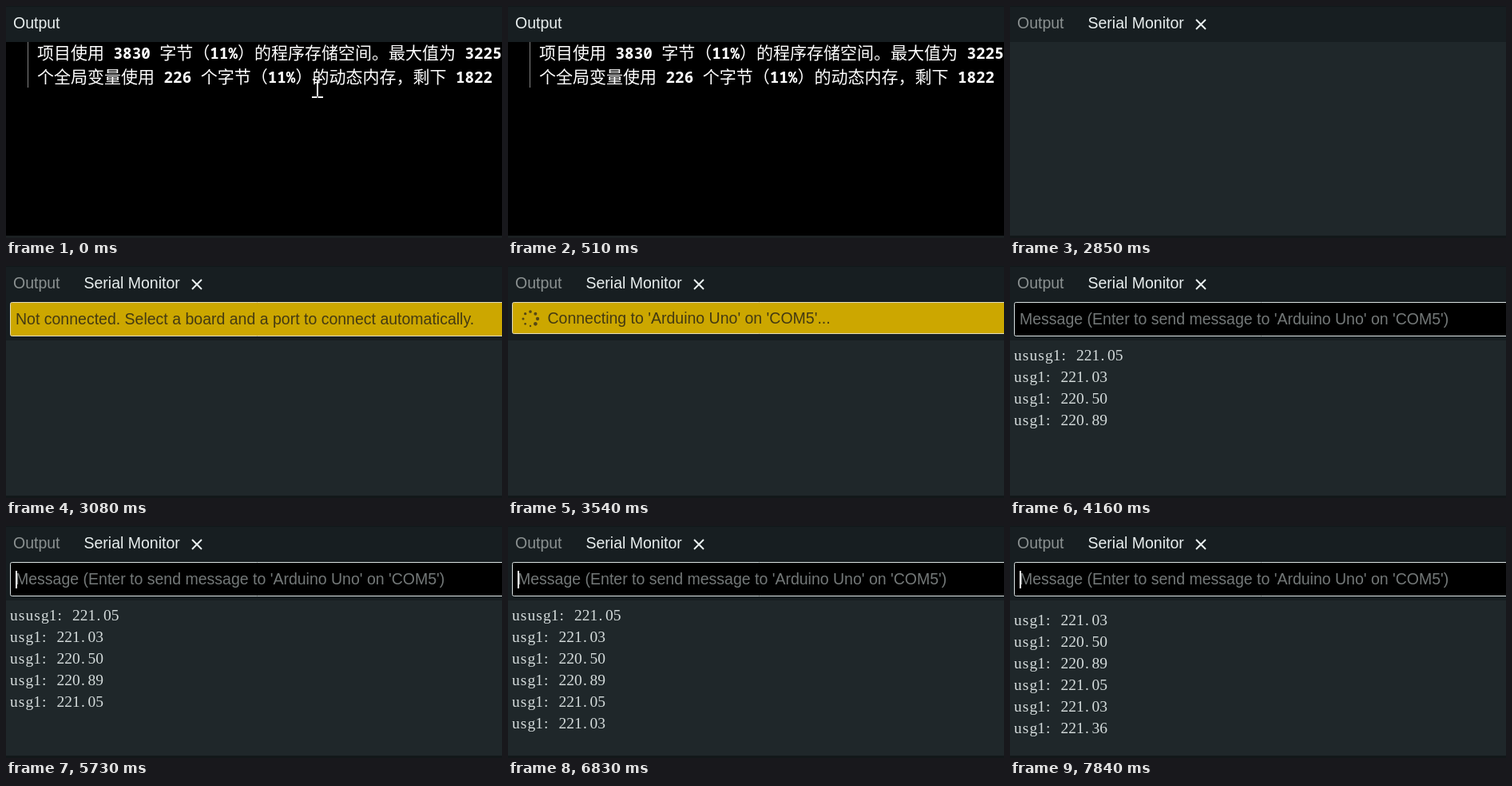
Recreate the animation shown at these times as an HTML page with a canvas. Size 621 by 290 pixels, loop 8 s.

```html
<!DOCTYPE html>
<html lang="zh">
<head>
<meta charset="utf-8">
<title>Serial monitor</title>
<style>
  html, body { margin: 0; width: 100%; height: 100%; overflow: hidden; background: #000; }
  canvas { display: block; width: 621px; height: 290px; }
</style>
</head>
<body>
<canvas id="stage" width="621" height="290"></canvas>
<script>
const ctx = document.getElementById('stage').getContext('2d');
const LOOP = 8000, W = 621, H = 290;
const UI = '19.5px "Liberation Sans", Arial, sans-serif';
const CJK = '21px "Noto Sans CJK SC", "Noto Sans CJK", sans-serif';
const MONO = 'bold 19.25px "Noto Sans Mono", monospace';
const LOG = '19.5px "Liberation Serif", serif';
const HEADER = '#171e21', PANEL = '#1f272a', LIGHT = '#e9efef';

const BUILD = [
  '项目使用 3830 字节（11%）的程序存储空间。最大值为 3225',
  '个全局变量使用 226 个字节（11%）的动态内存，剩下 1822'
];
const READINGS = ['ususg1: 221.05', 'usg1: 221.03', 'usg1: 220.50', 'usg1: 220.89',
  'usg1: 221.05', 'usg1: 221.03', 'usg1: 221.36'];
const CARET_TOGGLES = [3630, 4160, 4710, 5190, 5730, 6280, 6830, 7290, 7840];

function rect(x, y, w, h, color) {
  ctx.fillStyle = color;
  ctx.fillRect(x, y, w, h);
}

function text(str, x, y, color, font = UI) {
  ctx.font = font;
  ctx.fillStyle = color;
  ctx.fillText(str, x, y);
}

function line(color, width, ...segments) {
  ctx.strokeStyle = color;
  ctx.lineWidth = width;
  ctx.beginPath();
  for (const [x1, y1, x2, y2] of segments) {
    ctx.moveTo(x1, y1);
    ctx.lineTo(x2, y2);
  }
  ctx.stroke();
}

// Full-width characters take 21 px, ASCII ones 11.55 px.
function mixedText(str, x, y) {
  for (const run of str.match(/[ -~]+|[^ -~]+/g)) {
    const ascii = run.charCodeAt(0) < 128;
    text(run, x, y, '#fff', ascii ? MONO : CJK);
    x += run.length * (ascii ? 11.55 : 21);
  }
}

// Serif glyphs on a fixed 9.75 px pitch; punctuation sits left in its cell.
function logLine(str, y) {
  ctx.font = LOG;
  [...str].forEach((ch, i) => {
    const slack = 9.75 - ctx.measureText(ch).width;
    text(ch, 5 + i * 9.75 + slack * (/[.:]/.test(ch) ? 0.25 : 0.5), y, '#d5dcdc', LOG);
  });
}

function iBeam(x, y) {
  line('#fff', 2, [x, y - 11, x, y + 10],
    [x - 6, y - 11, x - 1.5, y - 11], [x + 1.5, y - 11, x + 6, y - 11],
    [x - 7, y + 11, x - 0.5, y + 11], [x + 0.5, y + 11, x + 7, y + 11]);
}

function field(height, fill, border) {
  ctx.beginPath();
  ctx.roundRect(5.5, 45.5, W, height - 1, 2);
  ctx.fillStyle = fill;
  ctx.fill();
  ctx.strokeStyle = border;
  ctx.lineWidth = 1;
  ctx.stroke();
}

function spinner(x, y) {
  ctx.fillStyle = '#574914';
  for (let i = 0; i < 8; i++) {
    const angle = (i - 6) * Math.PI / 4;
    ctx.beginPath();
    ctx.arc(x + 9 * Math.cos(angle), y + 9 * Math.sin(angle), 1.2 + 0.16 * i, 0, 7);
    ctx.fill();
  }
}

function outputTab(t) {
  rect(0, 45, W, 242, '#000');
  text('Output', 9, 27.5, LIGHT);
  rect(27, 45, 1, 57, '#808080');
  mixedText(BUILD[0], 39, 66);
  mixedText(BUILD[1], 39, 95.5);
  if (t < 70) iBeam(390, 103);
  else if (t >= 280 && t < 510) {
    const p = Math.floor((t - 280) / 77) / 2;
    iBeam(Math.round(395 + 108 * p), 255 - 198 * p);
  }
}

function readings(t) {
  const count = t < 3700 ? 0 : t < 5260 ? 4 : t < 6360 ? 5 : t < 7290 ? 6 : 7;
  const first = count === 7 ? 1 : 0;
  const scroll = first * 21;
  for (let i = first; i < count; i++) logLine(READINGS[i], 118 + 27 * i - scroll);
}

function monitorTab(t) {
  rect(0, 45, W, 242, PANEL);
  text('Output', 9, 27.5, '#8b9191');
  text('Serial Monitor', 97.5, 27.5, LIGHT);
  line(LIGHT, 2, [233, 17, 245, 29], [245, 17, 233, 29]);
  if (t < 3080) return;

  rect(0, 45, W, 48, HEADER);
  if (t < 3540) {
    field(43, '#cca700', '#e6dfbc');
    text('Not connected. Select a board and a port to connect automatically.', 12, 73, '#443a12');
  } else if (t < 3630) {
    field(40, '#cca700', '#e6dfbc');
    spinner(28, 66);
    text("Connecting to 'Arduino Uno' on 'COM5'...", 49.5, 72, '#443a12');
  } else {
    field(43, '#000', '#dae3e3');
    text("Message (Enter to send message to 'Arduino Uno' on 'COM5')", 12, 73, '#737878');
    if (CARET_TOGGLES.filter(at => at <= t).length % 2) rect(12, 56, 2, 22, '#fff');
    readings(t);
  }
}

function draw(now) {
  const t = now % LOOP;
  rect(0, 0, W, H, HEADER);
  rect(0, 0, W, 1, '#11181a');
  if (t < 2850) outputTab(t);
  else monitorTab(t);
  rect(0, 287, W, 3, t < 2850 ? '#1b2022' : '#12181a');
}

const start = performance.now();
function tick() {
  draw(performance.now() - start);
  requestAnimationFrame(tick);
}
tick();
</script>
</body>
</html>
```
